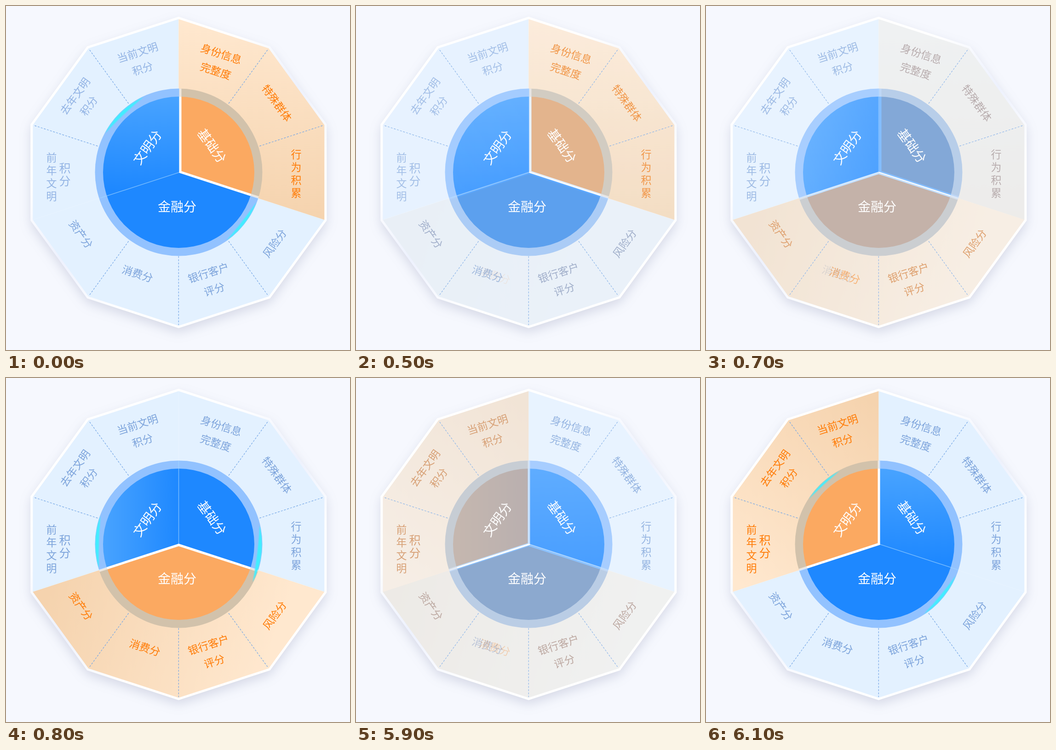
Animation, 748 px wide and 748 px high, one loop 8000 ms. Source, as an HTML page:

```html
<!DOCTYPE html>
<html lang="zh">
<head>
<meta charset="utf-8">
<style>
html, body { margin: 0; width: 100%; height: 100%; overflow: hidden; background: #f6f8fe; }
svg { display: block; width: 100vw; height: 100vh; }
text { font-family: "Noto Sans CJK SC", "Noto Sans CJK", sans-serif; font-weight: 500; text-anchor: middle; }
.hub { font-weight: 300; fill: #fff; }
.base { fill: #fff; filter: drop-shadow(0 10px 13px rgba(70, 80, 125, .2)); }
.dash { stroke: #74a6e6; stroke-width: 1.2; stroke-dasharray: 4 3; }
.line { fill: none; stroke: #fff; stroke-width: 5; }
.thin { stroke: #9bd2ff; stroke-opacity: .6; stroke-width: 1.6; }
.glint { fill: #40eeff; filter: blur(1px); }
</style>
</head>
<body>
<svg id="stage" viewBox="0 0 748 748"></svg>
<script>
const MID = [375.3, 361.8], ORANGE = '#fba961';
const SPANS = [[0, 3], [3, 7], [7, 10]];   // sectors, in steps of 36 degrees

// text, x, y, rotation, size, sector
const LABELS = [
  ['身份信息', 468, 104, 18, 23, 0], ['完整度', 456, 141, 18, 23, 0],
  ['特殊群体', 589, 211, 54, 23, 0],
  ['资产分', 163, 496, 54, 23, 1], ['消费分', 286, 582, 18, 23, 1],
  ['银行客户', 440, 580, -18, 23, 1], ['评分', 453, 616, -18, 23, 1],
  ['风险分', 584, 516, -54, 23, 1],
  ['当前文明', 286, 101, -18, 23, 2], ['积分', 297, 136, -18, 23, 2],
  ['去年文明', 150, 196, -54, 23, 2], ['积分', 180, 217, -54, 23, 2],
  ...column('行为积累', 631, 322, 23, 0),
  ...column('前年文明', 99, 329, 23, 2),
  ...column('积分', 128, 352, 25, 2)
];
const HUBS = [['基础分', 448, 304, 54, 28], ['金融分', 372, 436, 0, 28], ['文明分', 307, 307, -54, 28]];

// One look per highlighted sector
const LOOKS = [
  { c: [379, 361], warm: [376, 28, 376, 465], cool: [375, 198, 375, 400], glints: [[298, 335], [111, 145]] },
  { c: [375.5, 363], warm: [560, 640, 90, 470], cool: [212, 360, 375, 360], glints: [[253, 290], [77, 117]] },
  { c: [376, 361], warm: [60, 440, 376, 60], cool: [375, 198, 375, 400], glints: [[303, 332], [112, 147]] }
];

// start time, opacity of each look
const STEPS = [
  [0, 1, 0, 0], [500, .8, .1, 0], [600, .68, .3, 0], [700, .54, .54, 0], [800, 0, 1, 0],
  [5800, 0, .72, .25], [5900, 0, .6, .5], [6000, 0, .4, .75], [6100, 0, 0, 1]
];

function column(word, x, y, size, sector) {
  return [...word].map((ch, i) => [ch, x, y + 28 * i, 0, size, sector]);
}

function polar(deg, r, [x, y] = MID) {
  const a = deg * Math.PI / 180;
  return [x + r * Math.sin(a), y - r * Math.cos(a)].map(v => +v.toFixed(2));
}

function corners(from, to) {
  const list = [];
  for (let k = from; k <= to; k++) list.push(polar(36 * k, 336));
  return list;
}

const wedge = (s, fill, c = MID) => `<polygon points="${[c, ...corners(...SPANS[s])].join(' ')}" fill="${fill}"/>`;
const ray = (deg, r0, r1, cls, c = MID) => {
  const [x1, y1] = polar(deg, r0, c), [x2, y2] = polar(deg, r1, c);
  return `<line class="${cls}" x1="${x1}" y1="${y1}" x2="${x2}" y2="${y2}"/>`;
};
const write = ([s, x, y, rot, size], attrs) =>
  `<text transform="translate(${x} ${y}) rotate(${rot})" dy=".38em" font-size="${size}" ${attrs}>${s}</text>`;
const gradient = (id, [x1, y1, x2, y2], ...colors) =>
  `<linearGradient id="${id}" gradientUnits="userSpaceOnUse" x1="${x1}" y1="${y1}" x2="${x2}" y2="${y2}">` +
  colors.map((c, i) => `<stop offset="${i / (colors.length - 1)}" stop-color="${c}"/>`).join('') + '</linearGradient>';
const clip = (id, r) => `<clipPath id="${id}"><circle cx="375.5" cy="361.5" r="${r}"/></clipPath>`;
const glint = ([a, b]) =>
  `<path class="glint" d="M${polar(a, 181)}A181 181 0 0 1 ${polar(b, 181)}A900 900 0 0 0 ${polar(a, 181)}"/>`;

function look({ c, warm, cool, glints }, on) {
  const each = f => SPANS.map((_, s) => f(s)).join('');
  const ends = SPANS[on].map(k => polar(36 * k, 200, c));
  const line = `<polyline class="line" points="${[ends[0], c, ends[1]].join(' ')}"`;
  const color = s => s === on ? '#ff7b05' : on === 0 && s === 2 ? '#92b3e4' : '#7ca3db';
  const others = [0, 1, 2].filter(s => s !== on);
  const seam = [252, 0, 108][on];
  // the highlighted wedge goes last so that it covers the seams
  const stack = f => [...others, on].map(f).join('');
  return `<g class="look">
    ${gradient('warm' + on, warm, '#ffe8cf', '#f5d3ae')}
    ${gradient('cool' + on, cool, '#48a3ff', '#1e88ff')}
    ${stack(s => wedge(s, s === on ? `url(#warm${on})` : '#e3f1ff'))}
    ${[36, 72, 144, 180, 216, 288, 324].map(a => ray(a, a === 180 ? 168 : 185, 332, 'dash')).join('')}
    <g clip-path="url(#rim)">
      ${stack(s => wedge(s, s === on ? '#d2c2ab' : '#92c2ff', c))}
      ${line} opacity=".6"/>
      ${glints.map(glint).join('')}
    </g>
    <g clip-path="url(#disc)">
      ${stack(s => wedge(s, s === on ? ORANGE : s === 1 ? '#1e88ff' : `url(#cool${on})`, c))}
    </g>
    <g clip-path="url(#rim)">${ray(seam, 0, 182, 'thin', c)}</g>
    <g clip-path="url(#disc)">${line}/></g>
    ${LABELS.map(l => {
      const shifted = on === 1 && l[0] === '消费分' ? [l[0], 302, 586, 18, 23] : l;
      return write(shifted, `fill="${color(l[5])}"`);
    }).join('')}
    ${each(s => write(HUBS[s], 'class="hub"'))}
  </g>`;
}

const outline = corners(0, 9).join(' ');
const stage = document.getElementById('stage');
stage.innerHTML = `
  <defs>${clip('rim', 182)}${clip('disc', 164.5)}
  ${gradient('edge', [178, 91, 572, 635], '#fff', '#fff', '#edf1fd', '#fff', '#fff')}</defs>
  <polygon class="base" points="${outline}"/>
  ${LOOKS.map(look).join('')}
  <polygon points="${outline}" fill="none" stroke="url(#edge)" stroke-width="5"/>`;

const layers = [...stage.querySelectorAll('.look')];

function draw() {
  const t = performance.now() % 8000;
  const [, ...alpha] = STEPS.filter(s => s[0] <= t).pop();
  layers.forEach((g, i) => {
    g.style.opacity = alpha[i];
    g.style.visibility = alpha[i] ? 'visible' : 'hidden';
    // glints show only while a look is at rest
    g.querySelectorAll('.glint').forEach(p => p.style.opacity = alpha[i] === 1 ? 1 : 0);
  });
  requestAnimationFrame(draw);
}
draw();
</script>
</body>
</html>
```
